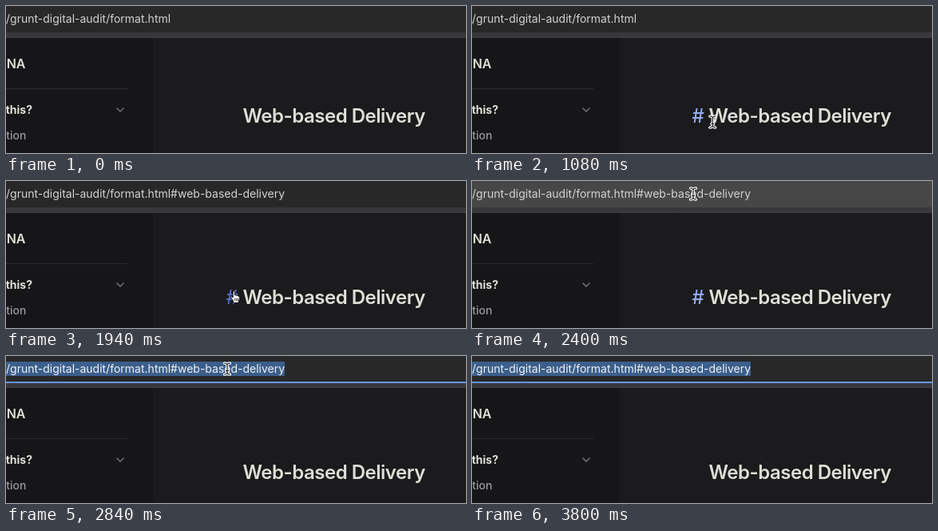
These frames come from a looping animation (576 by 184 pixels, 3.82 s). An HTML page:

```html
<!DOCTYPE html>
<html lang="en">
<head>
<meta charset="utf-8">
<style>
html, body { margin: 0; height: 100%; overflow: hidden; background: #1b1b1d; }
svg { display: block; width: 576px; height: 184px; font-family: Inter, "Noto Sans", sans-serif; }
.cursor path { stroke-linejoin: round; stroke-linecap: round; }
</style>
</head>
<body>
<svg viewBox="0 0 576 184">
  <rect width="576" height="184" fill="#1b1b1d"/>
  <rect y="40" width="184" height="144" fill="#161618"/>
  <path d="M0 103.5H152" stroke="#2b2b2e"/>
  <g text-anchor="end" fill="#dfdfd7">
    <text x="24.5" y="78" font-size="16" font-weight="600">DNA</text>
    <text x="33" y="135" font-size="14" font-weight="700">this?</text>
    <text x="25.5" y="167" font-size="14" font-weight="500" fill="#98989f">tion</text>
  </g>
  <path d="M138.5 127.5l4.5 4.5 4.5-4.5" fill="none" stroke="#77777c" stroke-width="1.4"/>

  <g id="heading" font-size="24" letter-spacing="-.48">
    <text id="hash" x="275.5" y="146" font-weight="500">#</text>
    <text x="296.5" y="146" font-weight="600" fill="#dfdfd7">Web-based Delivery</text>
  </g>

  <rect id="bar" width="576" height="33"/>
  <rect y="33" width="576" height="7" fill="#38383a"/>
  <path d="M0 39.5H576" stroke="#414143"/>
  <g id="focus">
    <rect y="7" width="349" height="18" fill="#3b5f8c"/>
    <rect y="32" width="576" height="2" fill="#6795e8"/>
  </g>
  <text id="url" x="0" y="21" font-size="14"></text>

  <g id="beam" class="cursor" fill="none">
    <path id="stem" d="M-3.5-7Q0-7 0-4.5Q0-7 3.5-7M0-4.5V4.5M-3.5 7Q0 7 0 4.5Q0 7 3.5 7M-1.5 2.5H1.5" stroke="#fff" stroke-width="3"/>
    <use href="#stem"/>
    <path d="M-3.5-7Q0-7 0-4.5Q0-7 3.5-7M0-4.5V4.5M-3.5 7Q0 7 0 4.5Q0 7 3.5 7M-1.5 2.5H1.5" stroke="#111" stroke-width="1.1"/>
  </g>
  <g id="hand" class="cursor">
    <path d="M-2.6 7V5L-5.4.8Q-6-.8-4.6-.8L-2.8 1V-6Q-2.6-7.4-1.6-7.4T-.5-6V-2Q.8-3 1.6-1.6Q3-2.4 3.6-.9Q5.4-1.4 5.4.6V3L4 7Z" fill="#fff" stroke="#111" stroke-width="1"/>
    <path d="M-.3 2V4.8M1.6 2V4.8M3.4 2V4.8" stroke="#111" stroke-width=".8"/>
  </g>
</svg>
<script>
const LOOP = 3820;
const $ = id => document.getElementById(id);
const mix = (a, b, k) => a + (b - a) * k;
const ramp = (t, from, to) => Math.min(1, Math.max(0, (t - from) / (to - from)));
const smooth = k => k * k * (3 - 2 * k);
const easeOut = k => 1 - (1 - k) ** 3;
const show = (id, on) => $(id).style.display = on ? "" : "none";

// start, end, target x, target y, easing
const moves = [
  [560, 780, 302.5, 145, easeOut],
  [1040, 1280, 287, 145, smooth],
  [2060, 2200, 277, 16, easeOut],
  [2840, 3030, 500, 200, k => k * k]
];

function pointer(t) {
  let x = 314, y = 194;
  for (const [from, to, tx, ty, ease] of moves) {
    const k = ease(ramp(t, from, to));
    x = mix(x, tx, k);
    y = mix(y, ty, k);
  }
  return [x, y];
}

function draw(t) {
  const [x, y] = pointer(t);
  const visited = t >= 1640, focused = t >= 2440;
  const hand = x < 292 && y > 125;

  for (const id of ["beam", "hand"]) $(id).setAttribute("transform", `translate(${x} ${y})`);
  show("beam", !hand);
  show("hand", hand);
  show("focus", focused);

  $("heading").setAttribute("transform", `translate(0 ${8 * smooth(ramp(t, 1640, 1900))})`);
  const hover = ramp(t, 1140, 1340) - ramp(t, 2100, 2260);
  const [r, g, b] = [[146, 80], [170, 107], [240, 196]].map(c => mix(...c, hover));
  $("hash").setAttribute("fill", `rgb(${r},${g},${b})`);
  $("hash").setAttribute("opacity", smooth(ramp(t, 660, 900)) - ramp(t, 2440, 2580));

  $("bar").setAttribute("fill", t >= 2400 && !focused ? "#474748" : "#282829");
  $("url").textContent = "/grunt-digital-audit/format.html" + (visited ? "#web-based-delivery" : "");
  $("url").setAttribute("fill", focused ? "#f2f2f2" : "#d2d2d3");
}

const start = performance.now();
function tick() {
  draw((performance.now() - start) % LOOP);
  requestAnimationFrame(tick);
}
tick();
</script>
</body>
</html>
```
